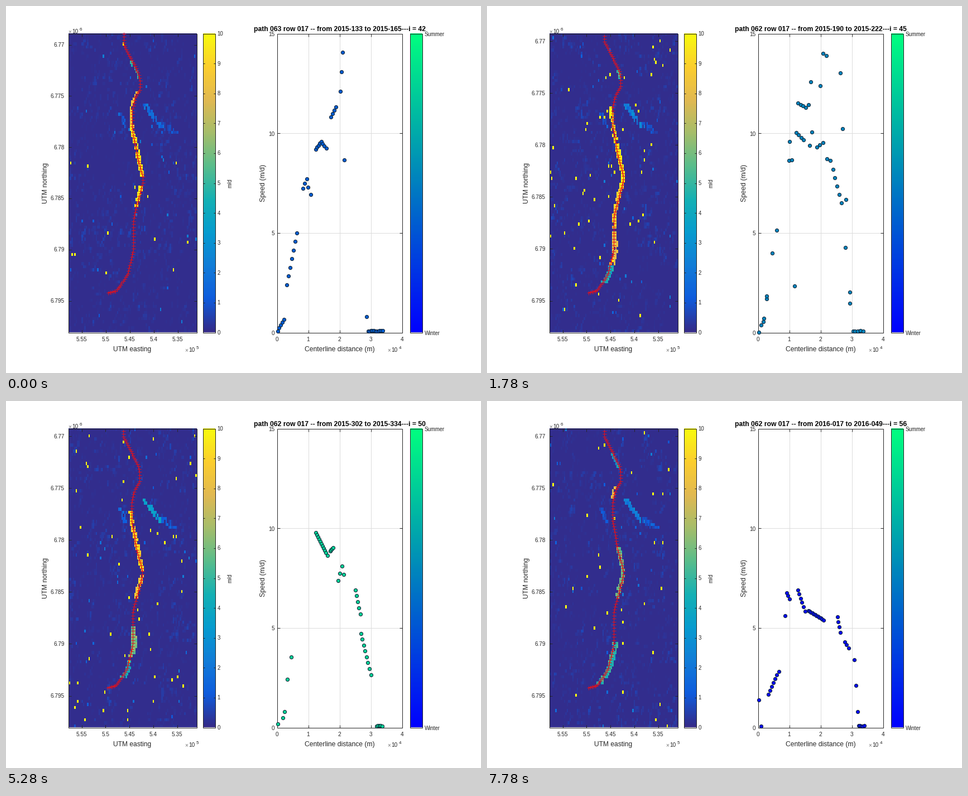
Write a matplotlib script that moves like this. It is 851 px wide and 658 px high and loops after 8000 ms.

```python
import numpy as np
import matplotlib.pyplot as plt
from matplotlib.animation import FuncAnimation
from matplotlib.collections import LineCollection
from matplotlib.colors import LinearSegmentedColormap
from matplotlib.patches import Rectangle

W, H, DPI = 851, 658, 64
PX = 72 / DPI              # points per pixel
STEP, LOOP = 20, 8000      # ms
INK = "#262626"
TOP, BOTTOM = 49, 585
MAP_L, MAP_R = 111, 341
PLOT_L, PLOT_R = 485, 709
ROWS, COLS = 98, 90
XS = np.linspace(MAP_L, MAP_R, 2 * COLS + 1)[1::2]
YS = np.linspace(TOP, BOTTOM, 2 * ROWS + 1)[1::2]

plt.rcParams["font.family"] = "Liberation Sans"

PARULA = LinearSegmentedColormap.from_list("parula", [
    "#352a87", "#0f5cdd", "#127dd8", "#079ccf", "#15b1b4",
    "#59bd8c", "#a5be6b", "#e1b952", "#fcce2e", "#f9fb0e"])

# Glacier centerline on the map, in pixels for path 063
CENTER = np.array([
    (210, 49), (210, 68), (222, 92), (236, 119), (239, 130), (239, 150),
    (231, 163), (225, 186), (225, 215), (235, 272), (244, 304), (244, 318),
    (231, 365), (228, 380), (227, 440), (217, 480), (203, 502), (196, 510),
    (181, 514)], float)

# Reach of the fast ice left and right of the centerline
REACH_Y = (180, 260, 340, 440, 500)
REACH_L = (-5, -3, -5, -2, -3)
REACH_R = (0, 6, 2, 7, 9)


def centerline(path):
    """The map window of path 062 is slightly larger in scale."""
    if path == 63:
        return CENTER
    x, y = CENTER.T
    return np.column_stack([x - 1, 528 - (528 - y) * 1.0145])


def stations(line):
    """Evenly spaced stations along the centerline, inside the map."""
    dx, dy = np.diff(line, axis=0).T
    dist = np.r_[0, np.cumsum(np.hypot(dx * 2.1, dy))]
    s = np.arange(0, dist[-1], 5.5)
    x, y = (np.interp(s, dist, axis) for axis in line.T)
    return x[y >= TOP - 1], y[y >= TOP - 1]


def date(day):
    late = day > 365
    return f"{2015 + late}-{day - 365 * late:03d}"


def speed_map(s):
    rng = np.random.default_rng(s["i"])
    fine = rng.normal(size=(ROWS, COLS))
    fine = (fine + np.roll(fine, 1, 0) + np.roll(fine, 1, 1)) / 1.7
    patch = np.kron(rng.random((14, 10)), np.ones((7, 9)))
    grid = 0.08 + 0.3 * np.clip(fine - 0.5, 0, 2) * patch

    def stroke(x0, y0, x1, y1, value, half):
        for row in np.flatnonzero((YS > y0) & (YS < y1)):
            x = np.interp(YS[row], (y0, y1), (x0, x1))
            hit = (abs(XS - x) < half) & (rng.random(COLS) < 0.85)
            grid[row, hit] = value + rng.normal(size=hit.sum()) * 0.35

    trib = s["trib"]
    stroke(204, 190, 213, 219, trib * 0.4, 4)
    stroke(278, 210, 300, 228, trib * 0.35, 9)
    stroke(246, 175, 277, 217, trib, 5)

    line = centerline(s["path"])
    for y0, y1, value in s["bands"]:
        for row in np.flatnonzero((YS >= y0) & (YS <= y1)):
            y = YS[row]
            off = XS - np.interp(y, line[:, 1], line[:, 0])
            hit = ((off >= np.interp(y, REACH_Y, REACH_L))
                   & (off <= np.interp(y, REACH_Y, REACH_R))
                   & (rng.random(COLS) > 0.1))
            grid[row, hit] = value + rng.normal(size=hit.sum()) * 0.4

    # Stray matches: most saturate, some are merely slow
    for n in range(s["strays"] + 30):
        cell = rng.integers(ROWS), rng.integers(COLS)
        grid[cell] = 10 if n < s["strays"] else rng.uniform(0.8, 2.4)
    return np.clip(grid, 0, 10)


def spread(x0, y0, x1=None, y1=None, n=1):
    if n == 1:
        return [(x0, y0)]
    return list(zip(np.linspace(x0, x1, n), np.linspace(y0, y1, n)))


def scene(i, day, trib, strays, tail, bands, runs):
    """Bands are (top, bottom, speed); runs are evenly spread dots."""
    dots = [p for run in runs for p in spread(*run)]
    dots += [(x, 582 + np.sin(x * 2)) for x in np.arange(tail, 676, 2.6)]
    return timed(dict(i=i, day=day, trib=trib, strays=strays,
                      bands=bands, dots=dots))


def between(i, day, a, b):
    """A scene that lies between two others."""
    return timed(dict(i=i, day=day, trib=(a["trib"] + b["trib"]) / 2,
                      strays=(a["strays"] + b["strays"]) // 2,
                      bands=b["bands"], dots=a["dots"][::2] + b["dots"][1::2]))


def timed(s):
    """One day lasts 31.25 ms; the two paths have their own 16-day cycle."""
    s["t"] = max(0, STEP * round((1280 + (s["day"] - 174) * 31.25) / STEP))
    s["path"] = 63 if s["day"] % 16 == 133 % 16 else 62
    return s


spring = scene(
    42, 133, 1.6, 13, 648,
    [(96, 132, 4.5), (155, 216, 8.8), (216, 305, 10), (320, 361, 9.7)],
    [(486, 582, 497, 561, 5), (502, 499, 520, 406, 7), (531, 326, 538, 309, 3),
     (540, 324, 545, 337, 2), (554, 256, 564, 242, 5), (566, 246, 573, 254, 3),
     (581, 198, 590, 180, 4), (598, 152, 602, 82, 3), (605, 275), (645, 556)])

summer = scene(
    44, 174, 0.5, 60, 676,
    [(106, 124, 5), (191, 302, 10), (330, 349, 10), (360, 388, 10),
     (418, 476, 10)],
    [(486, 584, 498, 553, 6), (500, 524, 510, 442, 3), (516, 405, 520, 398, 3),
     (541, 242, 548, 247, 2), (550, 501), (554, 172, 573, 183, 9),
     (575, 176, 582, 115, 4), (596, 142), (598, 82, 607, 88, 4),
     (631, 104, 634, 134, 3), (636, 219, 637, 232, 2), (642, 346),
     (647, 507, 655, 582, 4), (662, 344), (665, 582)])

fall = scene(
    47, 245, 4, 45, 658,
    [(115, 131, 5), (180, 325, 10), (320, 400, 9), (404, 466, 8.2),
     (466, 500, 4)],
    [(486, 557), (494, 565, 500, 519, 3), (518, 404), (540, 276, 548, 275, 4),
     (553, 226, 569, 242, 8), (577, 249, 583, 214, 4), (590, 252, 601, 244, 5),
     (605, 272, 617, 278, 5), (619, 292, 634, 352, 9), (638, 392, 653, 552, 5)])

late_fall = scene(
    50, 302, 3.6, 49, 663,
    [(197, 304, 9.2), (312, 355, 8.7), (402, 460, 6.2), (462, 500, 4)],
    [(486, 578), (495, 567, 498, 556, 2), (503, 498, 510, 458, 2),
     (554, 235, 575, 276, 11), (580, 268, 585, 262, 4), (594, 321, 601, 295, 3),
     (604, 310), (625, 338, 634, 381, 5), (635, 416, 653, 490, 8)])

december = scene(
    52, 334, 3.6, 18, 663,
    [(213, 260, 8.8), (282, 303, 8.6), (370, 465, 6), (460, 510, 4)],
    [(495, 562, 498, 550, 2), (554, 276, 569, 297, 7), (614, 340, 634, 396, 3),
     (637, 431, 650, 448, 6), (653, 462, 662, 570, 6)])

january = scene(
    54, 366, 3.7, 24, 668,
    [(92, 124, 4), (177, 208, 7.5), (337, 445, 5.6), (468, 506, 4)],
    [(500, 547, 503, 523, 2), (506, 582), (510, 505, 522, 471, 6),
     (542, 347, 547, 358, 4), (553, 330, 562, 332, 2), (591, 350),
     (604, 384, 617, 384, 6), (637, 418, 640, 421, 2), (653, 452, 662, 546, 5)])

winter = scene(
    56, 382, 2.3, 32, 665,
    [(92, 122, 3.8), (152, 174, 8), (260, 356, 5.8), (432, 506, 4.8)],
    [(486, 535), (490, 582), (503, 525, 522, 484, 7), (533, 384),
     (536, 343, 541, 354, 3), (556, 338, 569, 376, 6), (575, 375, 602, 392, 12),
     (627, 386, 632, 414, 4), (640, 431, 647, 442, 3), (657, 463, 663, 556, 3)])

SCENES = [
    spring, between(43, 142, spring, summer),
    summer, between(45, 190, summer, fall),
    fall, between(48, 277, fall, late_fall),
    late_fall,
    december, between(53, 341, december, january),
    january, between(55, 373, january, winter),
    winter,
]
STARTS = [s["t"] for s in SCENES]
MAPS = [speed_map(s) for s in SCENES]
STATIONS = {p: stations(centerline(p)) for p in (62, 63)}

# One axes in pixel units, y down
fig = plt.figure(figsize=(W / DPI, H / DPI), dpi=DPI, facecolor="white")
ax = fig.add_axes([0, 0, 1, 1])
ax.axis("off")


def label(x, y, text, size=10, ha="center", turn=0, color=INK, **kw):
    drop = 0.36 * size
    dx, dy = (drop, 0) if turn else (0, drop)
    return ax.text(x + dx, y + dy, text, fontsize=size * PX, ha=ha,
                   va="baseline", rotation=turn, rotation_mode="anchor",
                   color=color, **kw)


def picture(data, left, right, **kw):
    return ax.imshow(data, extent=(left, right, BOTTOM, TOP), aspect="auto",
                     interpolation="nearest", zorder=1, **kw)


def box(left, right):
    ax.add_patch(Rectangle((left, TOP), right - left, BOTTOM - TOP, fill=False,
                           ec=INK, lw=PX, zorder=4))


def lines(segments, color=INK, z=4):
    return ax.add_collection(LineCollection(segments, colors=color,
                                            linewidths=PX, zorder=z))


def side_ticks(ys, left, right, size=5):
    return [s for y in ys for s in ([(left, y), (left + size, y)],
                                    [(right - size, y), (right, y)])]


def end_ticks(xs, size=5):
    return [s for x in xs for s in ([(x, TOP), (x, TOP + size)],
                                    [(x, BOTTOM - size), (x, BOTTOM)])]


def power(x, y, exponent):
    label(x, y, "×", ha="left", color="#777777")
    label(x + 7, y, "10", ha="left")
    label(x + 20, y - 4, exponent, 8, "left")


# Speed map
speed = picture(MAPS[0], MAP_L, MAP_R, cmap=PARULA, vmin=0, vmax=10)
box(MAP_L, MAP_R)
track, = ax.plot([], [], "+", ms=7 * PX, mew=PX, color="#e0101c", zorder=5)
east_labels = [label(0, 597, f"{5.55 - 0.05 * n:g}") for n in range(5)]
north_labels = [label(104, 0, f"{6.77 + 0.005 * n:g}", ha="right")
                for n in range(6)]
map_ticks = lines([])
power(111, 45, "6")
power(320, 616, "5")
label(226, 614, "UTM easting", 12)
label(69, 317, "UTM northing", 12, turn=90)

# Colour bars
ramp = np.linspace(1, 0, 256)[:, None]
for left, cmap in ((352, PARULA), (723, "winter")):
    picture(ramp, left, left + 22, cmap=cmap)
    box(left, left + 22)
levels = np.linspace(BOTTOM, TOP, 11)
lines(side_ticks(levels[1:-1], 352, 374, 3))
for n, y in enumerate(levels):
    label(378, y, str(n), 9.6, "left")
label(400, 317, "m/d", turn=90)
label(749, TOP + 1, "Summer", 9.6, "left")
label(749, BOTTOM + 1, "Winter", 9.6, "left")

# Speed profile
xt = np.linspace(PLOT_L, PLOT_R, 5)
yt = np.linspace(BOTTOM, TOP, 4)
lines([[(x, TOP), (x, BOTTOM)] for x in xt[1:-1]]
      + [[(PLOT_L, y), (PLOT_R, y)] for y in yt[1:-1]], "#dcdcdc", 2)
box(PLOT_L, PLOT_R)
lines(side_ticks(yt[1:-1], PLOT_L, PLOT_R) + end_ticks(xt[1:-1]))
for n, x in enumerate(xt):
    label(x, 597, str(n))
for n, y in enumerate(yt):
    label(481, y + 1, str(5 * n), ha="right")
power(683, 616, "4")
label(597, 614, "Centerline distance (m)", 12.1)
label(459, 317, "Speed (m/d)", 12.1, turn=90)
title = label(597.5, 40, "", 12.07, weight="bold", color="black")
dots, = ax.plot([], [], "o", ms=6.2 * PX, mew=PX, mec="#102030", zorder=6)

ax.set_xlim(-0.5, W - 0.5)
ax.set_ylim(H - 0.5, -0.5)


def update(k):
    n = np.searchsorted(STARTS, k * STEP, side="right") - 1
    s = SCENES[n]
    speed.set_data(MAPS[n])
    track.set_data(*STATIONS[s["path"]])

    dx, dy = (43, 91.8) if s["path"] == 63 else (42.8, 93.1)
    east = 135 + dx * np.arange(5)
    north = 528 - dy * np.arange(5, -1, -1)
    for text, x in zip(east_labels, east):
        text.set_x(x)
    for text, y in zip(north_labels, north):
        text.set_y(y + 3.6)
    map_ticks.set_segments(side_ticks(north, MAP_L, MAP_R) + end_ticks(east))

    day = s["day"]
    title.set_text(f"path {s['path']:03d} row 017 -- from {date(day)} "
                   f"to {date(day + 32)}---i = {s['i']}")
    dots.set_data(*zip(*s["dots"]))
    season = ((day - 1) % 365) / 365
    dots.set_markerfacecolor((0, season, 1 - season / 2))
    return speed, track, map_ticks, title, dots, *east_labels, *north_labels


anim = FuncAnimation(fig, update, frames=LOOP // STEP, interval=STEP,
                     init_func=lambda: update(0), repeat=True, repeat_delay=0)
plt.show()
```
